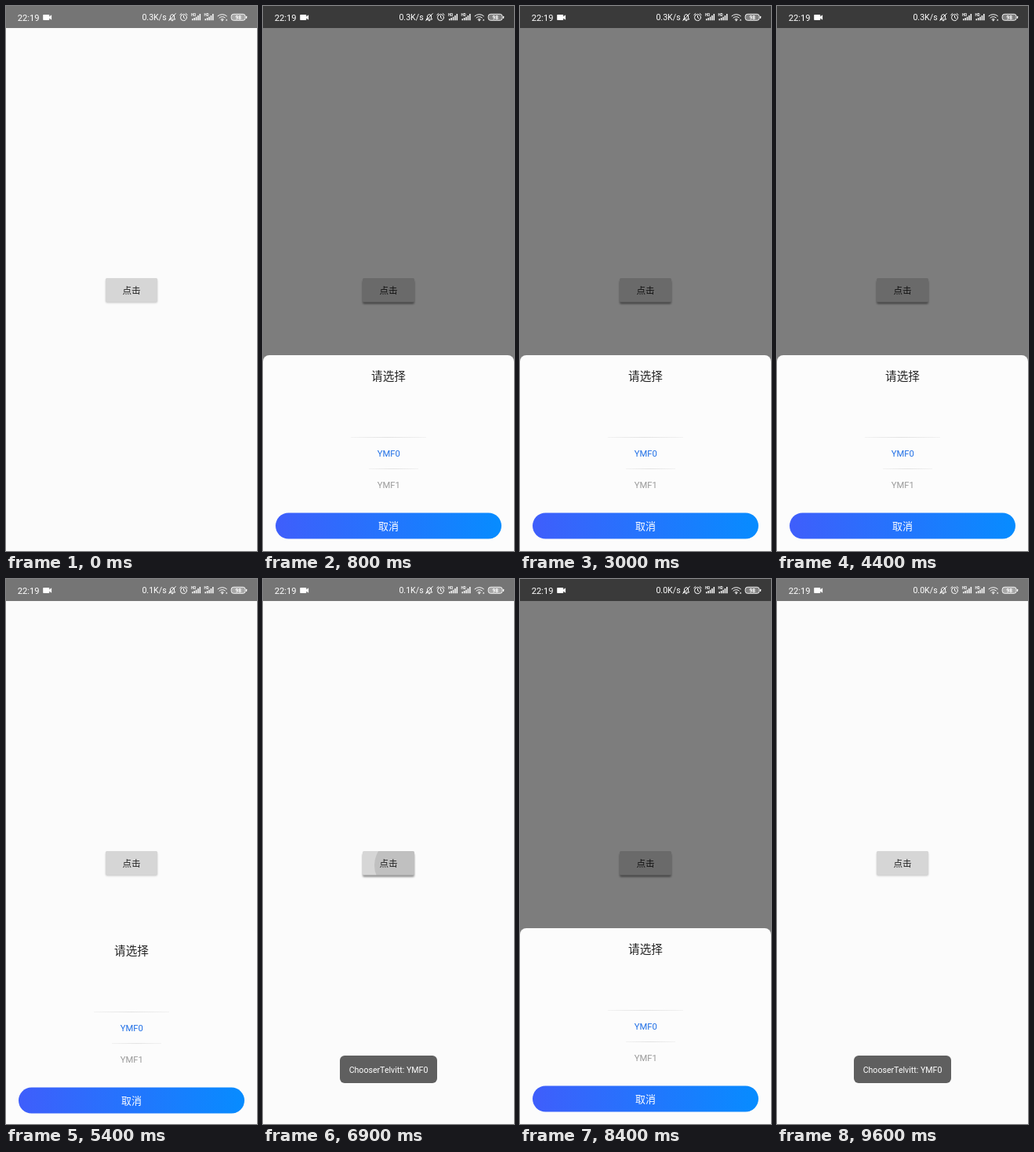
Write an HTML page that moves like this. It is 320 px wide and 693 px high and loops after 10 s.

```html
<!DOCTYPE html>
<html lang="zh">
<head>
<meta charset="utf-8">
<title>Picker dialog</title>
<style>
  html, body { margin: 0; width: 100%; height: 100%; overflow: hidden; background: #fbfbfb; }
  svg { display: block; width: 100vw; height: 100vh; }
  text { font-family: Roboto, "Noto Sans CJK SC", "Noto Sans CJK", sans-serif; }
  .mid { text-anchor: middle; }
  .line { fill: none; stroke: #fff; stroke-width: 1; stroke-linecap: round; stroke-linejoin: round; }
</style>
</head>
<body>
<svg viewBox="0 0 320 693">
  <defs>
    <linearGradient id="blue">
      <stop offset="0" stop-color="#3f5efb"/>
      <stop offset="1" stop-color="#078cff"/>
    </linearGradient>
    <linearGradient id="divider">
      <stop offset="0" stop-color="#e2e2e2" stop-opacity=".4"/>
      <stop offset=".5" stop-color="#e2e2e2"/>
      <stop offset="1" stop-color="#e2e2e2" stop-opacity=".4"/>
    </linearGradient>
    <filter id="blur" x="-20%" y="-40%" width="140%" height="180%"><feGaussianBlur stdDeviation="1.2"/></filter>
    <clipPath id="buttonClip"><rect x="127" y="346" width="66" height="30.5" rx="1.5"/></clipPath>
    <g id="signal" fill="#fff">
      <text x="0" y="13" font-size="4.6" font-weight="700">HD</text>
      <path d="M1 18.3v-2h1.5v2zM3.4 18.3v-3.2h1.5v3.2zM5.8 18.3v-4.6h1.5v4.6zM8.2 18.3v-6.4h1.5v6.4zM10.6 18.3v-8.3h1.5v8.3z"/>
    </g>
  </defs>

  <rect width="320" height="693" fill="#fbfbfb"/>
  <rect width="320" height="28" fill="#757575"/>

  <rect id="shadow" x="127" y="347.5" width="66" height="30" rx="2" filter="url(#blur)"/>
  <rect x="127" y="346" width="66" height="30.5" rx="1.5" fill="#d6d6d6"/>
  <circle id="ripple" cx="176" cy="364" clip-path="url(#buttonClip)"/>
  <text class="mid" x="160" y="365.5" font-size="11.6" fill="#222">点击</text>

  <rect id="scrim" width="320" height="693"/>

  <g id="sheet">
    <path d="M0 693V452a8 8 0 0 1 8-8H312a8 8 0 0 1 8 8V693z" fill="#fcfcfc"/>
    <text class="mid" x="160" y="476" font-size="14.6" fill="#222">请选择</text>
    <rect x="112" y="548" width="96" height="1" fill="url(#divider)"/>
    <rect x="135" y="588" width="63" height="1" fill="url(#divider)"/>
    <text class="mid" x="160.3" y="573" font-size="11.2" fill="#1f6fe6">YMF0</text>
    <text class="mid" x="160.3" y="612.5" font-size="11.2" fill="#999">YMF1</text>
    <rect x="16" y="644.5" width="288" height="33" rx="16.5" fill="url(#blue)"/>
    <text class="mid" x="160" y="666" font-size="13" fill="#fff">取消</text>
  </g>

  <g id="toast">
    <rect x="98" y="606" width="124" height="35" rx="6" fill="#595959" fill-opacity=".96"/>
    <text class="mid" x="160" y="628" font-size="10.6" fill="#fff">ChooserTelvitt: YMF0</text>
  </g>

  <g fill="#fff">
    <text x="14.7" y="18.6" font-size="11.2">22:19</text>
    <path d="M48 11h6.5q.8 0 .8.8v1.6l2.8-2.2v6.6l-2.8-2.2v1.6q0 .8-.8.8h-6.5q-.8 0-.8-.8v-5.4q0-.8.8-.8z"/>
    <text id="speed" x="204.6" y="18.4" font-size="10.6" text-anchor="end"></text>
    <path class="line" d="M208.3 17h7.4l-1.2-1.8v-2.5a2.6 2.6 0 0 0-5 0v2.5zM211.2 18.6h1.6M207.7 18.6l8.6-9"/>
    <g class="line">
      <circle cx="226.5" cy="14.6" r="4"/>
      <path d="M226.5 12.4v2.4l1.5.9M221.8 11.3l2-1.7M231.2 11.3l-2-1.7"/>
    </g>
    <use href="#signal" x="236"/>
    <use href="#signal" x="252.5"/>
    <path class="line" stroke-width="1.2" d="M270 12.8a8.3 8.3 0 0 1 11.4 0M272 15a5.4 5.4 0 0 1 7.4 0M274 17a2.6 2.6 0 0 1 3.4 0"/>
    <circle cx="275.7" cy="18.3" r="1"/>
    <path d="M280 18.6l1.2-2 1.2 2z"/>
    <rect x="287.2" y="10.3" width="18" height="8" rx="3" fill="#fff" fill-opacity=".35" stroke="#fff" stroke-width=".9"/>
    <rect x="306" y="12.7" width="1.2" height="3.2" rx=".6"/>
    <text class="mid" x="296.2" y="16.7" font-size="6.6" font-weight="700">98</text>
  </g>
</svg>
<script>
  const LOOP = 10000, STEP = 100;
  const SHEET_HEIGHT = 250;
  // Each visit: button tap, sheet dismissal and, if any, the end of its toast.
  const visits = [
    { tap: 200, close: 5400, toastEnd: 7600 },
    { tap: 6900, close: 8600, toastEnd: Infinity }
  ];
  const speeds = [[7000, '0.0K/s'], [4600, '0.1K/s'], [0, '0.3K/s']];

  const el = id => document.getElementById(id);
  const [shadow, ripple, scrim, sheet, toast, speed] =
    ['shadow', 'ripple', 'scrim', 'sheet', 'toast', 'speed'].map(el);
  const progress = (t, start, length) => Math.min(1, Math.max(0, (t - start) / length));
  const easeOut = p => 1 - (1 - p) ** 3;
  const set = (node, attrs) => {
    for (const name in attrs) node.setAttribute(name, attrs[name]);
  };

  function sheetOffset(t, { tap, close }) {
    return t < close
      ? SHEET_HEIGHT * (1 - easeOut(progress(t, tap + 50, 300)))
      : SHEET_HEIGHT * progress(t, close - 30, 330) ** 2;
  }

  function toastState(t) {
    for (const { close, toastEnd } of visits) {
      const shown = easeOut(progress(t, close, 400));
      const hidden = progress(t, toastEnd, 300);
      if (shown > 0 && hidden < 1) return { opacity: shown * (1 - hidden), y: 28 * (1 - shown) };
    }
    return { opacity: 0, y: 0 };
  }

  function render(t) {
    const visit = t < visits[1].tap ? visits[0] : visits[1];
    const open = t >= visit.tap && t < visit.close;
    const since = t - visit.tap;

    set(shadow, { opacity: open ? .4 : .2, y: open ? 349 : 347.5 });
    set(ripple, {
      r: 34 + Math.max(0, since) * .12,
      opacity: open ? .1 * (1 - progress(since, 100, 300)) : 0
    });
    set(scrim, { opacity: open ? .5 * progress(since, 0, 300) : 0 });

    const offset = t < visit.tap ? SHEET_HEIGHT : sheetOffset(t, visit);
    set(sheet, { transform: `translate(0 ${offset})` });

    const { opacity, y } = toastState(t);
    set(toast, { opacity, transform: `translate(0 ${y})` });

    speed.textContent = speeds.find(([from]) => t >= from)[1];
  }

  const start = performance.now();
  function tick() {
    const t = (performance.now() - start) % LOOP;
    render(Math.floor(t / STEP) * STEP);
    requestAnimationFrame(tick);
  }
  render(0);
  requestAnimationFrame(tick);
</script>
</body>
</html>
```
